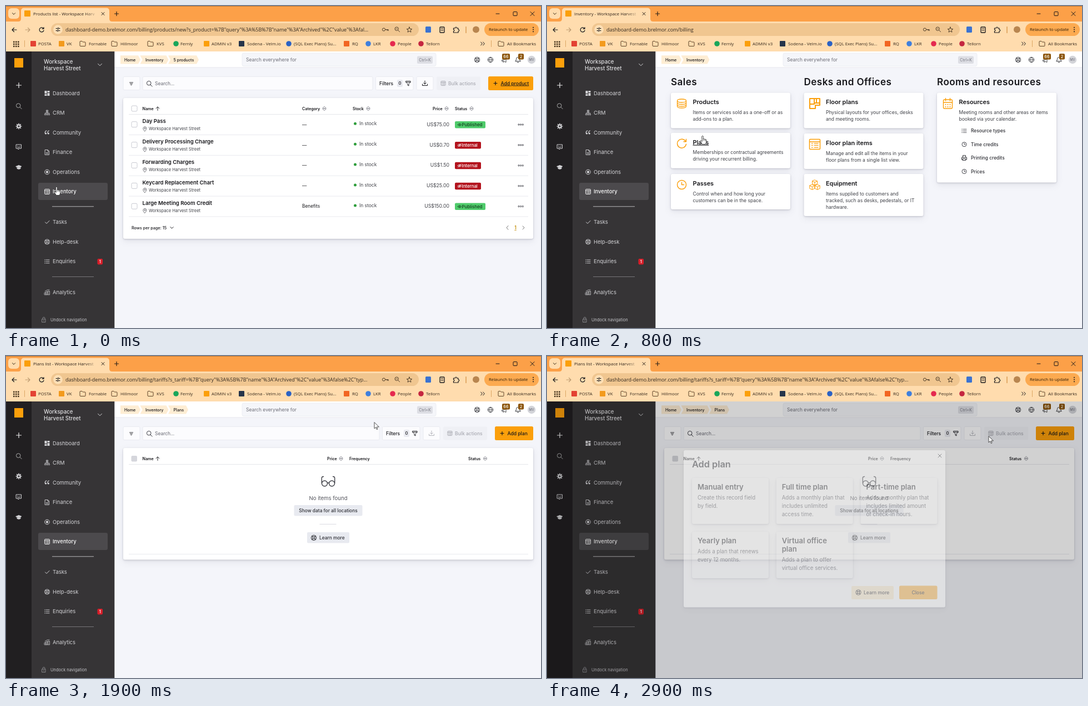
Write an HTML page that moves like this. It is 963 px wide and 581 px high and loops after 3 s.

```html
<!DOCTYPE html>
<html lang="en">
<head>
<meta charset="utf-8">
<title>Dashboard walkthrough</title>
<style>
html, body { margin: 0; width: 100%; height: 100%; overflow: hidden; background: #f4f5fa; }
svg { display: block; width: 963px; height: 581px; font-family: Inter, "Open Sans", sans-serif; font-optical-sizing: none; }
.chrome { font-family: "Open Sans", "Noto Sans", sans-serif; }
.card { filter: drop-shadow(0 1.5px 1.5px rgba(40, 42, 70, .22)) drop-shadow(0 4px 6px rgba(40, 42, 70, .09)); }
.heading { letter-spacing: .45px; }
.hover .title, .under { text-decoration: underline; }
</style>
</head>
<body>
<svg id="stage" viewBox="0 0 963 581" xmlns="http://www.w3.org/2000/svg"></svg>
<script>
const INK = '#17171b', GREY = '#53545c', ORANGE = '#fb9f0b', TAB = '#ffdcae', SITE = 'Workspace Harvest Street';

// Drawing helpers. Text is placed by its vertical middle.
const rect = (x, y, w, h, fill, r = 0, more = '') =>
  `<rect x="${x}" y="${y}" width="${w}" height="${h}" rx="${r}" fill="${fill}" ${more}/>`;
const dot = (x, y, r, fill, more = '') => `<circle cx="${x}" cy="${y}" r="${r}" fill="${fill}" ${more}/>`;
const ring = (x, y, r, c, w = 1) => dot(x, y, r, 'none', `stroke="${c}" stroke-width="${w}"`);
const path = (d, c = INK, w = 1, fill = 'none') =>
  `<path d="${d}" fill="${fill}" stroke="${c}" stroke-width="${w}" stroke-linejoin="round" stroke-linecap="round"/>`;
const text = (x, y, s, size, fill = INK, weight = 400, more = '') =>
  `<text x="${x}" y="${(y + size * .36).toFixed(2)}" font-size="${size}" fill="${fill}" font-weight="${weight}" ${more}>${s}</text>`;
const at = (x, y, s) => `<g transform="translate(${x} ${y})">${s}</g>`;
const group = (id, s, more = '') => `<g id="${id}" ${more}>${s}</g>`;
const frame = (x, y, w, h) => rect(x, y, w, h, '#fcfcfe', 2, 'stroke="#e6e7ee" stroke-width=".8"');
const card = (x, y, w, h) => rect(x, y, w, h, '#fff', 3, 'class="card"');
const END = 'text-anchor="end"', MID = 'text-anchor="middle"';

// Icons, centred on 0,0
const plus = (c, r = 4, w = 1.2) => path(`M${-r} 0H${r}M0 ${-r}V${r}`, c, w);
const cross = (c, r = 2.5, w = 1) => path(`M${-r} ${-r}L${r} ${r}M${r} ${-r}L${-r} ${r}`, c, w);
const lens = (c, r = 4, w = 1) => ring(-.8, -.8, r, c, w) + path(`M${r * .7 - .6} ${r * .7 - .6}L${r + 1.4} ${r + 1.4}`, c, w);
const buoy = (c, r = 4.6) => ring(0, 0, r, c) + ring(0, 0, r * .45, c) +
  [0, 1, 2, 3].map(i => `<g transform="rotate(${45 + i * 90})">${path(`M${r * .45} 0H${r}`, c, 1.2)}</g>`).join('');
const clock = (c, r, w = 1) => ring(0, 0, r, c, w) + path(`M0 ${-r * .55}V0H${r * .5}`, c, w);
const listing = c => [-3, 0, 3].map(y => dot(-4, y, .7, c) + path(`M-2 ${y}H4`, c, .9)).join('');
const sheet = (c, w, h, n = 3, k = 1) => rect(-w / 2, -h / 2, w, h, 'none', 1.2, `stroke="${c}" stroke-width="${k}"`) +
  path(`M${-w / 2} ${-h / 4}H${w / 2}`, c, k) + Array.from({length: n}, (_, i) => {
    const y = -h / 4 + (i + .8) * h * .2;
    return path(`M${-w * .3} ${y}h${w * .1}M${-w * .05} ${y}H${w * .32}`, c, k * .85);
  }).join('');
const folder = path('M-5 -3.5q0 -1 1 -1h3l1.3 1.5H4q1 0 1 1V3.5q0 1 -1 1H-4q-1 0 -1 -1Z', '#5b4327', 1);
const chevron = (dx, c, w = 1) => path(`M${-dx} -3L${dx} 0L${-dx} 3`, c, w);
const down = (c, r = 3) => path(`M${-r} ${-r / 2}L0 ${r / 2}L${r} ${-r / 2}`, c, 1);
const sorter = path('M-3 -1L0 -4L3 -1ZM-3 1L0 4L3 1Z', '#85868e', .8);
const funnel = path('M-4 -4H4V-2L1 1V4.5L-1 3.5V1L-4 -2ZM-4 -2H4', INK, .9);
const tray = c => path('M0 -4.5V1.5M-2.3 -.8L0 1.5L2.3 -.8M-4.5 1.5V4H4.5V1.5', c, 1);

function browser() {
  const marks = [
    [49, 58, 'POSTA', '#e34133'], [100, 109, 'VK', '#f39a1c'], [138, 149, 'Fornable'], [195, 206, 'Hillmoor'],
    [260, 271, 'KVS'], [306, 314, 'Fernly', '#19a65a', 1], [361, 370, 'ADMIN v3', ORANGE], [424, 434, 'Sodena - Velm.io', '#26354a'],
    [509, 518, '(SQL Exec Plans) Su...', '#2b62c4', 1], [613, 623, 'RQ', '#f26522'], [652, 661, 'LKR', '#3f7fdd', 1],
    [696, 705, 'People', '#e5294f', 1], [747, 756, 'Tellorn', '#c42640', 1]
  ];
  const bookmark = ([x, tx, s, c, round]) =>
    (!c ? at(x, 68, folder) : round ? dot(x, 68, 4.8, c) : rect(x - 5, 63, 10, 10, c, 1)) + text(tx, 68, s, 7.8, '#33271a');
  const field = '#f0c690';
  return rect(0, 0, 963, 29, '#fca048') + rect(0, 0, 963, 1, '#c4782f') + rect(0, 28, 963, 54, TAB) +
    rect(4, 4, 20, 19, '#ffdcae', 6) + at(14, 14, down('#33230f', 2.6)) +
    `<path d="M22 28q5 0 5 -5V9q0 -5.500 5.500 -5.500H180.500q5.500 0 5.500 5.500V23q0 5 5 5Z" fill="${TAB}"/>` +
    rect(33, 8, 11, 11, ORANGE, 1) + text(49, 14, '', 7.8, '#2b2118', 400, 'id="tab"') +
    rect(142, 6, 24, 17, 'url(#fade)') + rect(166, 6, 18, 18, TAB) +
    at(174.5, 14, cross('#2b2118')) + at(199, 14, plus('#2b2118', 3.6)) +
    path('M882 14h6', INK) + rect(913, 10.5, 7, 7, 'none', 1, `stroke="${INK}"`) + at(947.5, 14, cross(INK, 3.5)) +
    path('M19 43H11M14.5 39.5L11 43L14.5 46.5', INK, 1.2) + path('M35 43H43M39.5 39.5L43 43L39.5 46.5', '#bd9a70', 1.2) +
    path('M67.3 40.5A4 4 0 1 0 68 44M68 38.5V41.2H65.3', INK, 1.2) +
    rect(81, 31, 662, 23, field, 11.5) + dot(93.5, 42.5, 8.3, '#ffe0b6') +
    path('M90 40.5h2.5M95.5 40.5H97M90 44.5h1.5M94.5 44.5H97', INK, 1.1) + ring(94, 40.5, 1.3, INK, .9) + ring(93, 44.5, 1.3, INK, .9) +
    text(107, 42.5, '', 8.95, '#33291f', 400, 'id="url"') +
    rect(671, 35, 60, 15, field) +
    ring(680, 42.5, 2.6, '#4d3c28') + path('M683 42.5h5v2M686 42.5v1.5', '#4d3c28', 1.2) +
    at(704, 42, lens('#4d3c28', 3.2) + path('M-2 -.8h2.5', '#4d3c28', .8)) +
    path('M726 38L727.3 41.3L730.8 41.5L728.1 43.7L729 47.2L726 45.3L723 47.2L723.9 43.7L721.2 41.5L724.7 41.3Z', '#4d3c28') +
    rect(755, 37, 10, 11, '#3b73d1', 1.5) + rect(781, 38, 8, 10, 'none', 1, `stroke="${INK}" stroke-width="1.3"`) + path('M783 41h4M783 44h4', INK) +
    path('M805.5 40h3q0 -2 1.5 -2t1.5 2h2.5v2.5q1.8 0 1.8 1.5t-1.8 1.5V48h-8.5v-2.5q1.5 0 1.5 -1.5t-1.5 -1.5Z', INK, 1.2) +
    path('M828 37.5V48.5', '#d18c3c', 1.2) + dot(846, 42.5, 6, '#b98650') +
    rect(861, 31, 98, 23, '#fcaa50', 11.5) + text(869, 42.5, 'Relaunch to update', 7.75, '#2b1c08') + [38.8, 42.5, 46.2].map(y => dot(949, y, 1, INK)).join('') +
    [0, 4, 8].map(i => [0, 4, 8].map(j => rect(13 + i, 63.5 + j, 2.6, 2.6, '#4a3820')).join('')).join('') +
    path('M33.5 62.5v11M873.5 62.5v11', '#dba664') + marks.map(bookmark).join('') +
    at(856, 68, chevron(1.3, INK)) + at(860, 68, chevron(1.3, INK)) + at(891, 68, folder) + text(902, 68, 'All Bookmarks', 7.8, '#33271a');
}

function sidebar() {
  const c = '#d4d4d7';
  const icons = {
    Dashboard: rect(-4.5, -4.5, 4, 5, c) + rect(.5, -4.5, 4, 3, c) + rect(-4.5, 1.5, 4, 3, c) + rect(.5, -.5, 4, 5, c),
    CRM: path('M0 -1.5V1M-3.5 2V.5H3.5V2', c, .9) + rect(-1.3, -4.3, 2.6, 2.6, 'none', 0, `stroke="${c}"`) + ring(-3.5, 3.2, 1.1, c, .9) + ring(0, 3.2, 1.1, c, .9) + ring(3.5, 3.2, 1.1, c, .9),
    Community: path('M-1 -3.5Q-4 -3 -3.8 1M3.5 -3.5Q.7 -3 .9 1', c, 1.2) + dot(-2.4, 1.5, 1.6, c) + dot(2.3, 1.5, 1.6, c),
    Finance: path('M-3.5 -4.5H1L3.5 -2V4.5H-3.5ZM1 -4.5V-2H3.5M-1.8 .5H1.8M-1.8 2.5H1.8', c, .9),
    Operations: ring(0, 0, 4.3, c) + rect(-2, -2, 4, 4, c, 1),
    Inventory: sheet('#fff', 9, 9, 3, .9),
    Tasks: path('M-3.5 0L-1 2.5L4 -2.5', c),
    'Help-desk': buoy(c, 4.4),
    Enquiries: listing(c),
    Analytics: path('M-4.5 1H-2V4.5H-4.5ZM-1.5 -1H1V4.5H-1.5ZM2 -2H4.5V4.5H2ZM-4 -1.5L0 -4L4 -4.5', c, .8)
  };
  const rows = [157.5, 192.5, 228.5, 264, 299.5, 335, 390, 425.5, 461, 516.5];
  const items = Object.entries(icons).map(([s, icon], i) => {
    const on = s === 'Inventory';
    return at(74, rows[i], icon) + text(84, rows[i], s, 9.45, on ? '#fff' : c, on ? 500 : 400);
  }).join('');
  const gear = ring(0, 0, 2.6, c, 2.1) + Array.from({length: 8}, (_, i) => `<g transform="rotate(${i * 45})">${path('M3.7 0H4.7', c, 1.6)}</g>`).join('');
  return rect(0, 82, 46, 499, '#211f21') + rect(46, 82, 149.3, 499, '#363436') +
    rect(15, 94, 16, 17, ORANGE) + at(23, 143, plus('#eee', 4.5)) + at(23, 180.5, lens('#aaa', 3.8)) + at(23, 217, gear) +
    at(23, 254, path('M-4.5 -4H4.5V3H1L-1 5V3H-4.5Z', c) + path('M-2 -1.5v.5M2 -1.5v.5M-2 1H2', c)) +
    at(23, 291, path('M-5 -1.5L0 -3.5L5 -1.5L0 .5Z', c, 1, c) + path('M-3 .5V2.5Q0 4 3 2.5V.5', c, 1, c)) +
    text(68, 100.5, 'Workspace', 9.7, '#e2e2e4', 500) + text(68, 112.5, 'Harvest Street', 9.7, '#e2e2e4', 500) + at(169, 106, down(c, 3.5)) +
    rect(58, 319, 125, 31, '#4c4a4d', 3) + items +
    rect(83, 361.3, 75, 1, '#b9b9bb') + rect(83, 488, 75, 1, '#77767a') +
    rect(164.5, 456, 9.5, 10.5, '#d71f2a', 2) + text(169.2, 461.3, '1', 7, '#fff', 600, MID) +
    at(68, 566, path('M-3 -1H3V4.5H-3ZM-2 -1V-2.5Q-2 -4.5 0 -4.5T2 -2.5V-1M0 1V2.5', '#8f8f93', .9)) + text(80, 566, 'Undock navigation', 7.45, '#c2c2c6');
}

function topbar() {
  const icon = '#35363c';
  const crumb = (id, x, w, s) => {
    const first = x === 206;
    return group(id, `<path d="M${x} 89.3H${x + w - 4}L${x + w} 97L${x + w - 4} 104.5H${x}L${x + (first ? 0 : 4)} 97Z" fill="#feedd3"/>` +
      text(x + (first ? 7 : 9.5), 97, s, 7.2, INK, 500));
  };
  return rect(195, 82, 768, 29, '#fff') + rect(195, 110.5, 768, .8, '#e1e2e9') +
    crumb('home', 206, 36, 'Home') + crumb('inv', 241.5, 51, 'Inventory') + crumb('crumb5', 292, 55, '5 products') + crumb('crumbPlans', 292, 36, 'Plans') +
    rect(425, 85, 349, 23.5, '#f5f6fa', 3, 'stroke="#eceef3"') + text(432, 97, 'Search everywhere for', 8.45, '#6c6d76') +
    rect(740, 90.5, 28, 13.5, '#dddee4', 2) + text(754, 97.3, 'Ctrl+K', 7.1, '#777882', 400, MID) +
    at(848, 97, buoy(icon)) + ring(872, 97, 4.6, icon) + path('M867.5 97h9M872 92.5Q867.5 97 872 101.5Q876.5 97 872 92.5', icon, .8) +
    path('M893 97.5h2l5 -2v6l-5 -2h-2ZM895 100v2', icon, .9) + path('M917 99.5q1.5 -1 1.5 -4t3 -3t3 3t1.5 4ZM920 101.5q1.5 1 3 0', icon, 1) +
    rect(893, 86, 14, 10.5, '#8b5306', 2) + text(900, 91.3, '66', 7.4, '#fff', 500, MID) +
    rect(922, 86, 10, 10.5, '#8b5306', 2) + text(927, 91.3, '2', 7.4, '#fff', 500, MID) +
    dot(946, 97, 7.2, '#d3d4d9') + text(946, 97, 'MV', 5.6, '#777882', 500, MID);
}

function toolbar(dx, label, x, id) {
  const off = dx ? '#b3b4bb' : INK;
  return frame(211, 127.5, 30, 24) + path('M222.5 138h6M223.5 140.3h4M224.8 142.5h1.4', INK, .9) +
    frame(246, 127.5, 414 + dx, 24) + at(258, 140, lens('#3b3c43', 3.8)) + text(268, 139.5, 'Search...', 8.45, '#65666f') +
    at(dx, 0, frame(665.5, 127.5, 67.5, 24) + text(672, 139.5, 'Filters', 8.5, INK, 500) + rect(704, 133, 10, 13, '#e9eaf0', 2) + text(709, 139.5, '0', 7.6, INK, 500, MID) +
      at(724, 139.5, funnel) + frame(739, 127.5, 30, 24) + at(754, 139.5, tray(off)) +
      rect(775, 127.5, 79, 24, '#eff0f5', 2) + at(787, 139.5, sheet('#a9aab2', 8, 8, 3, .9)) + text(796, 139.5, 'Bulk actions', 8.55, '#a9aab2', 500)) +
    group(id, rect(x, 127, 949 - x, 25, ORANGE, 2.5) + at(x + 13, 139.5, plus(INK, 3)) + text(x + 22.5, 139.5, label, 8.55, INK, 500, 'class="title"'));
}

const head = (x, s, sort) => text(x, 185, s, 7.2, INK, 600) + (sort ? at(sort, 185, sorter) : '');
const nameHead = head(245.5, 'Name') + path('M273 188.5V182M270 184.8L273 182L276 184.8', INK, .9);

function products() {
  const rows = [['Day Pass', '75.00', 1], ['Delivery Processing Charge', '0.70'], ['Forwarding Charges', '1.50'], ['Keycard Replacement Chart', '25.00'], ['Large Meeting Room Credit', '150.00', 1, 'Benefits']];
  const box = y => rect(226, y - 5, 10, 10, '#fff', 2, 'stroke="#c9cad2"');
  const row = ([name, price, live, kind], i) => {
    const ink = live ? '#123d1c' : '#fff';
    return at(0, i * 36.9, box(213.7) + text(245.5, 207.7, name, 9.55, INK, 600) +
      at(250, 221.5, path('M-2 2.5Q-4 .5 -3 -2Q0 -5.5 3 -2Q4 .5 0 4.5Z', '#55565e', .8) + ring(0, -.8, 1.2, '#55565e', .8)) + text(257, 221.3, SITE, 7.5, '#3f4047') +
      text(533, 213.7, kind || '—', 8.3, INK) + dot(628.5, 212.3, 2.5, '#2f9e3c') + text(636, 212.3, 'In stock', 8.45, '#3f4047') +
      text(798, 213.5, 'US$' + price, 8.7, '#3f4047', 400, END) + rect(808, 208, live ? 55 : 47, 12.5, live ? '#4fcb6b' : '#b3131d', 2) +
      at(816.5, 214.3, path('M-3.3 0Q0 -4.2 3.3 0Q0 4.2 -3.3 0Z', ink, .8) + ring(0, 0, 1, ink, .8) + (live ? '' : path('M-3 3L3 -3', ink, .8))) +
      text(820.5, 214.4, live ? 'Published' : 'Internal', 7.85, ink, 500) +
      [923, 926.6, 930.2].map(x => ring(x, 214, 1.2, '#45464d', .9)).join('') + rect(221, 232, 719, .8, '#e3e4eb'));
  };
  return toolbar(0, '<tspan class="under">Add product</tspan>', 868, 'addProduct') + card(211, 166, 738, 254) + box(185) + nameHead +
    head(533, 'Category', 573) + head(624, 'Stock', 652) + head(768, 'Price', 793) + head(808, 'Status', 838) +
    rect(221, 195, 719, .8, '#dfe0e7') + rows.map(row).join('') + text(226, 400, 'Rows per page: 15', 7.25, INK, 500) + at(298.5, 400, down(INK, 2.6)) +
    at(902.5, 400, path('M1.5 -3.5L-1.5 0L1.5 3.5', '#777')) + at(931.5, 400, chevron(1.5, '#777', 1)) + text(917, 400, '1', 8.3, '#c08a00', 600, MID + ' class="under"');
}

function landing() {
  const o = ORANGE;
  const tile = (id, x, y, h, title, lines, icon, more = '') => group(id, card(x, y, 215, h) + at(x + 19.5, y + 19.5, icon) +
    text(x + 39.5, y + 17, title, 10.9, INK, 600, 'class="title"') + lines.map((s, i) => text(x + 39.5, y + 35.5 + i * 12.2, s, 8.5, '#3f4047')).join('') + more);
  const stack = path('M-8 -5Q-8 -8 0 -8T8 -5T0 -2T-8 -5V5Q-8 8 0 8T8 5V-5M-8 -1.5Q-8 1.5 0 1.5T8 -1.5M-8 2Q-8 5 0 5T8 2', o, 1.3);
  const loop = path('M7 -4A8 8 0 1 0 8 1M8 -8V-3.5H3.5', o, 1.4);
  const plan = path('M-9 -9H9V3H1V9H-9ZM-1 -9V1H-9M-1 -1H9M3 -9V-1', o, 2);
  const cube = (x, y) => at(x, y, path('M0 -4.5L4.5 -2.5V2.5L0 4.5L-4.5 2.5V-2.5ZM-4.5 -2.5L0 -.5L4.5 -2.5M0 -.5V4.5', o, 1));
  const cal = rect(-8, -7, 16, 16, 'none', 2, `stroke="${o}" stroke-width="1.4"`) + path('M-8 -2H8M-4 -9.5V-5M4 -9.5V-5', o, 1.4) +
    [-4, 0, 4].map(x => rect(x - .9, 1, 1.8, 1.8, o) + rect(x - .9, 5, 1.8, 1.8, o)).join('');
  const printer = path('M-2.5 -1V-4.5H2.5V-1M-2.5 3H-4.5V-1H4.5V3H2.5M-2.5 1.5H2.5V4.5H-2.5Z', '#35363c');
  const links = [['Resource types', listing('#44454c')], ['Time credits', clock('#44454c', 4)], ['Printing credits', printer], ['Prices', clock('#44454c', 4)]]
    .map(([s, icon], i) => at(751, 225.3 + i * 24.4, icon) + text(763, 225.3 + i * 24.4, s, 8.4, '#2d2e34', 500)).join('');
  return [[223, 'Sales'], [462.5, 'Desks and Offices'], [702, 'Rooms and resources']].map(([x, s]) => text(x, 137, s, 17.1, INK, 600, 'class="heading"')).join('') +
    tile('goods', 223, 156.5, 64, 'Products', ['Items or services sold as a one-off or as', 'add-ons to a plan.'], stack) +
    tile('plans', 223, 230, 64, 'Plans', ['Memberships or contractual agreements', 'driving your recurrent billing.'], loop) +
    tile('passes', 223, 303, 64, 'Passes', ['Control when and how long your', 'customers can be in the space.'], clock(o, 8, 1.4)) +
    tile('floor', 462.5, 156.5, 64, 'Floor plans', ['Physical layouts for your offices, desks', 'and meeting rooms.'], plan) +
    tile('floorItems', 462.5, 230, 64, 'Floor plan items', ['Manage and edit all the items in your', 'floor plans from a single list view.'], sheet(o, 19, 18, 3, 1.5)) +
    tile('kit', 462.5, 303, 76, 'Equipment', ['Items supplied to customers and', 'tracked, such as desks, pedestals, or IT', 'hardware.'], cube(0, -4) + cube(-4.7, 4.3) + cube(4.7, 4.3)) +
    tile('rooms', 702, 156.5, 162, 'Resources', ['Meeting rooms and other areas or items', 'booked via your calendar.'], cal, links);
}

function planList() {
  const tick = rect(225.5, 180, 10.5, 10.5, '#d5d6dc', 2);
  const busy = rect(221, 196, 719, 87, '#f9f9fc') + rect(221, 283, 719, .8, '#e3e4eb') + head(590, 'Price', 616) + head(631, 'Frequency') + head(852, 'Status', 881.5) +
    path('M572 236.5H570Q568 236.5 568 234.5V217.5Q568 215.5 570 215.5H586Q588 215.5 588 217.5V220M571 219.5H585', '#4a4b52', 1.3) +
    path('M571 223v9M574.5 236.5h-2', '#4a4b52', 1.2) + at(581.5, 228.5, lens('#4a4b52', 7, 1.4) + path('M6 6L9 9', '#4a4b52', 1.6)) +
    text(579.7, 256.5, 'Searching...', 9.6, GREY, 400, MID);
  const none = head(578, 'Price', 603) + head(618, 'Frequency') + head(832, 'Status', 862.5) +
    ring(573.5, 230, 5, '#3f4047', 1.4) + ring(586.5, 230, 5, '#3f4047', 1.4) + path('M578.5 229.5Q580 228 581.5 229.5M568.3 229.5V220Q568.5 217.5 571.5 217.5M591.7 229.5V220Q591.5 217.5 588.5 217.5', '#3f4047', 1.4) +
    text(580, 256.5, 'No items found', 9.6, GREY, 400, MID) + rect(518.5, 269, 123, 19.5, '#e8eaf0', 2) + text(580, 279, 'Show data for all locations', 8.4, '#2d2e34', 500, MID) +
    rect(564.5, 303, 30, .8, '#d2d3da') + rect(542, 318, 76, 19.5, '#e8eaf0', 2) + at(554, 328, buoy('#2d2e34')) + text(564, 328, 'Learn more', 8.4, '#2d2e34', 500) + rect(221, 357, 719, .8, '#e3e4eb');
  const base = h => card(211, 166, 738, h) + tick + nameHead + rect(221, 195, 719, .8, '#dfe0e7');
  return toolbar(12, 'Add plan', 880, 'addPlan') + group('busy', base(128) + busy) + group('none', base(201.5) + none);
}

function dialog() {
  const ink = '#34353b';
  const tile = (x, y, h, title, lines) => card(x, y, 138, h) + title.map((s, i) => text(x + 10, y + 16.5 + i * 14.5, s, 13, ink, 600)).join('') +
    lines.map((s, i) => text(x + 10, y + 21 + title.length * 15 + i * 14.8, s, 9.65, '#5a5b63')).join('');
  return rect(0, 82, 963, 499, '#000', 0, 'fill-opacity=".18"') + group('dialog',
    rect(246, 170, 471, 283.5, '#fff', 3, 'class="card"') + text(261, 195, 'Add plan', 16.3, ink, 600) + at(707, 180, cross(ink, 3)) +
    tile(261, 220, 83, ['Manual entry'], ['Create this record field', 'by field.']) +
    tile(412.7, 220, 83, ['Full time plan'], ['Adds a monthly plan that', 'includes unlimited', 'access time.']) +
    tile(564.5, 220, 83, ['Part-time plan'], ['Adds a monthly plan that', 'includes limited amount', 'of check-in hours.']) +
    tile(261, 317, 84, ['Yearly plan'], ['Adds a plan that renews', 'every 12 months.']) +
    tile(412.7, 317, 84, ['Virtual office', 'plan'], ['Adds a plan to offer', 'virtual office services.']) +
    rect(548, 415, 76, 24, '#fdeccb', 2) + at(560.5, 426.5, buoy(ink)) + text(570, 426.5, 'Learn more', 8.5, ink, 500) +
    rect(634, 414.5, 68.5, 24.5, '#fbb545', 2.5) + text(668, 426.5, 'Close', 8.5, ink, 500, MID), 'opacity=".43"');
}

const cursors = group('arrow', path('M0 0V11L2.6 8.6L4.4 12.6L6 11.9L4.3 8H8Z', '#222', .8, '#fff')) +
  group('hand', path('M-1.2 1Q0 -.8 1.2 1V6Q2.5 5 3.3 6.3Q4.7 5.5 5.3 6.9Q6.6 6.5 6.7 8V11Q6.5 13 5.2 15.5H-.7Q-1.5 13 -4 10.5Q-4.8 9 -3.3 8.8L-1.2 10.3Z', '#222', .8, '#fff') + path('M1.2 9V6M3.3 9V6.5M5.3 9.2V7', '#222', .6));

const stage = document.getElementById('stage');
stage.innerHTML = `<defs><linearGradient id="fade"><stop stop-color="${TAB}" stop-opacity="0"/><stop offset="1" stop-color="${TAB}"/></linearGradient></defs>` +
  rect(0, 0, 963, 581, '#f4f5fa') + group('pageProducts', products()) + group('pageLanding', landing()) + group('pagePlans', planList()) +
  topbar() + sidebar() + group('modal', dialog()) + group('chrome', browser(), 'class="chrome"') + group('cursor', cursors);

const $ = id => document.getElementById(id);
const show = (id, on) => { $(id).style.display = on ? '' : 'none'; };

function hover(id, dy, on) {
  $(id).setAttribute('class', on ? 'hover' : '');
  $(id).setAttribute('transform', `translate(0 ${on ? dy : 0})`);
}

const HOST = 'dashboard-demo.brelmor.com/billing';
const QUERY = '%7B"query"%3A%5B%7B"name"%3A"Archived"%2C"value"%3Afal';

// Pointer stops: time, x, y
const STOPS = [[0, 91, 326], [100, 91, 326], [400, 107, 326], [500, 150, 322], [600, 226, 310], [700, 268, 248], [800, 280, 234], [1000, 280, 234],
  [1200, 279.5, 247], [1600, 279.5, 247], [1700, 335, 228], [1900, 663, 120], [2100, 790, 122], [2300, 868, 134], [2500, 903, 142], [2800, 903, 142], [2900, 795, 145], [3000, 795, 145]];

function pointer(t) {
  const i = STOPS.findIndex(s => s[0] > t);
  const [a, b] = [STOPS[i - 1], STOPS[i]], k = (t - a[0]) / (b[0] - a[0]);
  return [a[1] + (b[1] - a[1]) * k, a[2] + (b[2] - a[2]) * k];
}

function render(time) {
  const t = Math.floor(time % 3000 / 100) * 100;
  const within = (a, b) => t >= a && t < b;
  show('pageProducts', t < 200);
  show('pageLanding', within(200, 1100));
  show('pagePlans', t >= 1500);
  show('busy', t < 1700);
  show('none', t >= 1700);
  show('crumb5', t < 200);
  show('crumbPlans', t >= 1500);
  show('modal', t >= 2900);
  hover('passes', -1.3, t === 600);
  hover('plans', -1.3, within(700, 1100));
  hover('addPlan', .8, within(2400, 2900));
  $('tab').textContent = (t < 500 ? 'Products list' : t < 1100 ? 'Inventory' : 'Plans list') + ' - ' + SITE.slice(0, t < 500 ? 14 : 17);
  $('url').textContent = HOST + (t < 200 ? `/products/new?s_product=${QUERY}...` : t < 1100 ? '' : `/tariffs?s_tariff=${QUERY}se%2C"typ...`);
  const hand = t < 500 || within(600, 1100) || within(2400, 2900);
  show('hand', hand);
  show('arrow', !hand);
  $('cursor').setAttribute('transform', `translate(${pointer(t).join(' ')})`);
}

const start = performance.now();
function tick(now) {
  render(Math.max(0, now - start));
  requestAnimationFrame(tick);
}
render(0);
requestAnimationFrame(tick);
</script>
</body>
</html>
```
